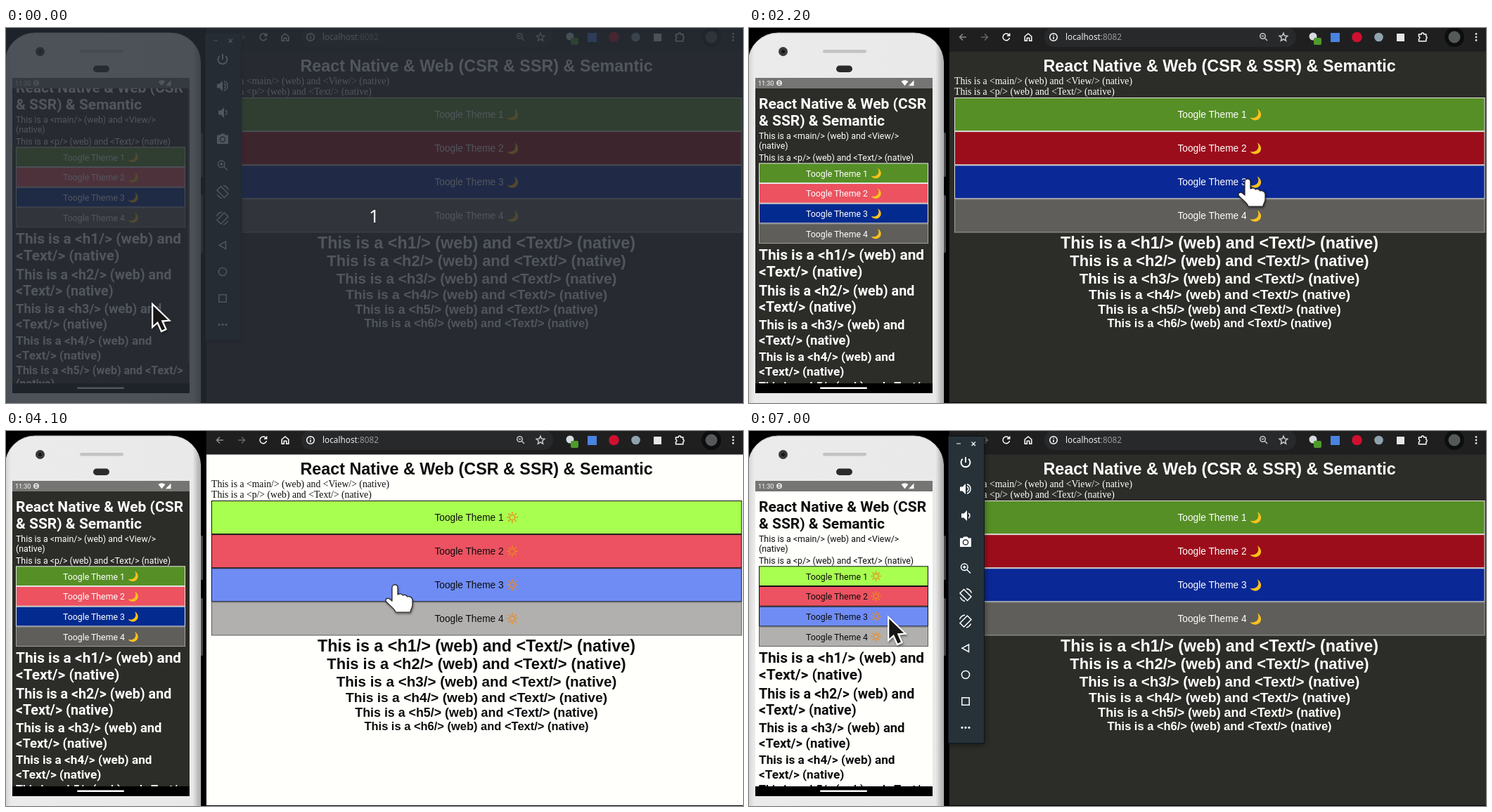
Animation of 1048x534 px, one loop 8 s. Source, as an HTML page:

```html
<!DOCTYPE html>
<html lang="en">
<head>
<meta charset="utf-8">
<title>Theme toggle demo</title>
<style>
html, body { margin: 0; width: 100%; height: 100%; overflow: hidden; background: #000; }
svg { display: block; width: 1048px; height: 534px; }
.dark { --bg: #2c2c28; --fg: #fff; --line: #e4e4e0; --line4: #a3a29e;
  --b1: #568f26; --b2: #9c0d1b; --b3: #0a2896; --b4: #5f5e5a; }
.light { --bg: #fffffc; --fg: #0c0c0c; --line: #111; --line4: #5c5c5a;
  --b1: #a8ff50; --b2: #ec5261; --b3: #6f8cf5; --b4: #b1b0ae; }
#phone.dark { --b2: #ec5260; --b3: #032a8f; }
.bg { fill: var(--bg); }
.page text { fill: var(--fg); }
.dark .sun, .light .moon { display: none; }
.roboto { font-family: Roboto, sans-serif; }
.sans { font-family: "Liberation Sans", Arial, sans-serif; }
.serif { font-family: "Liberation Serif", "Times New Roman", serif; }
.ui { font-family: "Noto Sans", "Open Sans", sans-serif; }
.icon { fill: none; stroke: #fff; stroke-width: 1.5; }
.solid { fill: #fff; stroke: none; }
</style>
</head>
<body>
<svg viewBox="0 0 1048 534">
  <defs>
    <clipPath id="screen"><rect x="9" y="86" width="252" height="420"/></clipPath>
    <linearGradient id="shell">
      <stop offset="0" stop-color="#d2d2d2"/><stop offset=".03" stop-color="#ebebeb"/>
      <stop offset=".96" stop-color="#e9e9e9"/><stop offset="1" stop-color="#a9a9a9"/>
    </linearGradient>
    <filter id="shadow" x="-50%" y="-50%" width="200%" height="200%">
      <feDropShadow dx="1" dy="2" stdDeviation="1.5" flood-opacity=".45"/>
    </filter>
    <filter id="glow" x="-40%" y="-10%" width="180%" height="120%">
      <feDropShadow dx="0" dy="2" stdDeviation="4" flood-opacity=".5"/>
    </filter>
    <path id="moon" fill="#fcc21b" d="M10.5.5C17 4 17.5 12 11.5 15C7.5 17 3 15.5.8 12.3C5 13.5 9 12.5 11 9.5C12.8 6.8 12.5 3.3 10.5.5Z"/>
    <g id="sun" fill="none" stroke="#ee8a1c" stroke-width="1.4">
      <circle cx="8" cy="8" r="3.6"/>
      <path d="M8 .3V3M8 13V15.7M.3 8H3M13 8H15.7M2.6 2.6L4.4 4.4M11.6 11.6L13.4 13.4M2.6 13.4L4.4 11.6M11.6 4.4L13.4 2.6"/>
    </g>
  </defs>

  <rect width="1048" height="534"/>

  <!-- handset -->
  <g fill="#4a4a4a">
    <rect x="275" y="149" width="5" height="63" rx="1.5"/>
    <rect x="275" y="238" width="5" height="82" rx="1.5"/>
  </g>
  <rect x="-1" y="7" width="277.5" height="600" rx="42" fill="url(#shell)" stroke="#c4c4c4"/>
  <circle cx="48.5" cy="33.5" r="6.5" fill="#3a3a3c"/>
  <circle cx="48.5" cy="33.5" r="2.6" fill="#15171c"/>
  <rect x="105" y="31" width="62" height="4.5" rx="2.2" fill="#c3c3c3"/>
  <rect x="124" y="53.5" width="23" height="9.5" rx="4.7" fill="#2b2b2d"/>
  <g id="phone" class="page dark">
    <rect class="bg" x="9" y="86" width="252" height="420"/>
    <g clip-path="url(#screen)">
      <g id="content" class="roboto"></g>
      <rect id="bar" x="258.5" y="86" width="2.2" height="391" fill="#777" opacity=".6"/>
    </g>
  </g>
  <rect x="9" y="71" width="252" height="15" fill="#757573"/>
  <text class="roboto" x="13" y="81.5" font-size="9" fill="#fff">11:30</text>
  <circle cx="43" cy="78.3" r="3.2" fill="none" stroke="#fff" stroke-width="1.3"/>
  <path d="M40 78.3H46" stroke="#fff" stroke-width="1.3"/>
  <path d="M216.5 76Q221.5 72.6 226.5 76L221.5 82.3ZM227 82.3H234.5V74.5Z" fill="#fff"/>
  <rect x="9" y="506" width="252" height="14"/>
  <rect x="101" y="511.5" width="67" height="2.6" rx="1.3" fill="#fff"/>

  <!-- browser -->
  <rect x="285" width="763" height="34" fill="#1f1f20"/>
  <rect x="420" y="-1" width="358" height="28" rx="14" fill="#28292a"/>
  <g class="icon" stroke-width="1.4">
    <path stroke="#8b8b8b" d="M309 13H299.5M304 8.5L299.5 13L304 17.5"/>
    <path stroke="#666" d="M330 13H339.5M335 8.5L339.5 13L335 17.5"/>
    <path d="M369.7 10A4.8 4.8 0 1 0 370.5 14M370.7 7.5V11H367"/>
    <path d="M392.2 12L397 8L401.8 12V18.3H398.7V14.3H395.3V18.3H392.2Z"/>
    <circle cx="433" cy="13" r="5.3"/><path d="M433 12.3V16M433 9.7V11"/>
    <g stroke="#c5c5c5"><circle cx="730.5" cy="11.5" r="3.8"/><path d="M733.3 14.3L737 18M728.7 11.5H732.3"/>
    <path d="M760 7.2L761.7 11L765.8 11.4L762.7 14.1L763.6 18.2L760 16L756.4 18.2L757.3 14.1L754.2 11.4L758.3 11Z"/></g>
    <path d="M952.5 9H956A1.9 1.9 0 0 1 959.8 9H962.8V12A1.9 1.9 0 0 1 962.8 15.6V18.7H952.5V15.6A1.9 1.9 0 0 0 952.5 12Z"/>
  </g>
  <text class="ui" x="450" y="17" font-size="11.8" fill="#eee">localhost<tspan fill="#9a9a9a">:8082</tspan></text>
  <circle cx="802" cy="12" r="5.5" fill="#d5dbe0"/>
  <rect x="803" y="14" width="11" height="10" rx="2" fill="#4f9a2c"/>
  <rect x="827" y="7" width="13" height="13" fill="#4a83e0"/>
  <circle cx="864.5" cy="13" r="7.3" fill="#d0102f"/>
  <circle cx="895.5" cy="13" r="6.3" fill="#8fa3ad"/>
  <rect x="921" y="8" width="11" height="11" fill="#e6e6e6"/>
  <circle cx="1003" cy="13" r="14" fill="#0d0e0e"/>
  <circle cx="1003" cy="13" r="8.5" fill="#55595a"/>
  <g fill="#ddd"><circle cx="1034" cy="8.5" r="1.4"/><circle cx="1034" cy="13" r="1.4"/><circle cx="1034" cy="17.5" r="1.4"/></g>
  <g id="web" class="page dark">
    <rect class="bg" x="285" y="33.5" width="763" height="499.5"/>
  </g>

  <!-- emulator controls -->
  <g id="tools">
    <rect x="283.5" y="7.5" width="51" height="437" fill="#263238" stroke="#11181b" filter="url(#glow)"/>
    <g class="icon">
      <path stroke-width="1.1" d="M295 18H301M316.5 15.5L322 21M322 15.5L316.5 21"/>
      <path stroke-width="2" d="M308 37V45M303.8 39.8A6.5 6.5 0 1 0 312.2 39.8"/>
      <path class="solid" d="M300 79.5H303.5L308 75V90L303.5 85.5H300ZM302 117.5H305.5L310 113V128L305.5 123.5H302Z"/>
      <path d="M310 79A4 4 0 0 1 310 86M310 75.8A7 7 0 0 1 310 89.2M312 117A4 4 0 0 1 312 124"/>
      <path class="solid" d="M300 152.5H304L305.5 150.5H310.5L312 152.5H316V165H300Z"/>
      <circle cx="308" cy="158.5" r="3.6" fill="#fff" stroke="#263238"/>
      <circle cx="306.3" cy="193.8" r="4.8"/><path d="M309.8 197.5L315 202.5M304 193.8H308.6M306.3 191.5V196.1"/>
      <g id="turn"><path d="M305.5 225.5L316 236L310.5 241.5L300 231ZM300.5 237A10 10 0 0 0 307 242.5M309 224.5A10 10 0 0 1 316.5 230.5"/></g>
      <use href="#turn" transform="translate(616 37.5) scale(-1 1)"/>
      <path d="M312.5 304V314.5L303 309.2Z"/>
      <circle cx="308" cy="347" r="5.6"/>
      <rect x="302.8" y="379.8" width="10.4" height="10.4"/>
      <path stroke-width="3.2" stroke-linecap="round" d="M303 422.3h.01M308 422.3h.01M313 422.3h.01"/>
    </g>
  </g>

  <g id="veil">
    <rect width="1048" height="534" fill="#262b34" opacity=".8"/>
    <text class="ui" x="523.5" y="277" font-size="26" fill="#fff" text-anchor="middle">1</text>
  </g>

  <g id="pointer" filter="url(#shadow)">
    <path id="arrow" fill="#151515" stroke="#fff" stroke-width="2.2" d="M1.2 3V36L8.5 29.5L14 42L20.5 39L15.3 27.3L25.5 26.5Z"/>
    <path id="hand" fill="#fff" stroke="#222" stroke-width="1.2" stroke-linejoin="round" d="M-4 5C-4-.5 4-.5 4 5V15C7 13 10 14 11 16C14 14.5 17 16 17.5 18C21 17 25 19 25 23V30C25 34 22 36 22 40H1C0 35-7 31-12.5 25C-14.5 21-10 18.500-7 21.500L-4 24Z"/>
  </g>
</svg>
<script>
const NS = 'http://www.w3.org/2000/svg';
const $ = id => document.getElementById(id);

function add(parent, tag, attrs, text) {
  const el = document.createElementNS(NS, tag);
  for (const key in attrs) el.setAttribute(key, attrs[key]);
  if (text) el.textContent = text;
  parent.appendChild(el);
  return el;
}

const write = (parent, x, y, size, text, more) =>
  add(parent, 'text', { x, y, 'font-size': size, ...more }, text);

function buttons(parent, box, label) {
  for (let i = 0; i < 4; i++) {
    const y = box.y + i * box.h;
    add(parent, 'rect', {
      x: box.x + .5, y: y + .5, width: box.w - 1, height: box.h - 1,
      style: `fill:var(--b${i + 1});stroke:var(--line${i === 3 ? '4' : ''})`
    });
    const mid = y + box.h / 2;
    write(parent, label.x, mid + label.dy, label.size, `Toogle Theme ${i + 1}`, { class: label.font });
    for (const name of ['moon', 'sun'])
      add(parent, 'use', {
        href: '#' + name, class: name,
        transform: `translate(${label.icon} ${mid - label.s * 8}) scale(${label.s})`
      });
  }
}

const bold = { 'font-weight': 700 };

function buildPhone() {
  const g = $('content');
  write(g, 14, 114.5, 21, 'React Native & Web (CSR', bold);
  write(g, 14, 139, 21, '& SSR) & Semantic', bold);
  write(g, 14, 158, 12.34, 'This is a <main/> (web) and <View/>');
  write(g, 14, 172.3, 12.34, '(native)');
  write(g, 14, 188.7, 12.34, 'This is a <p/> (web) and <Text/> (native)');
  buttons(g, { x: 14, y: 192.3, w: 241, h: 28.7 },
    { x: 81, dy: 4.9, size: 12.3, icon: 173, s: .94, font: 'roboto' });
  [[329.7, 24.6], [380.7, 23.6], [429, 22], [473.8, 21]].forEach(([y, gap], i) => {
    const size = 20.9 - i * 1.23;
    write(g, 14, y, size, `This is a <h${i + 1}/> (web) and`, bold);
    write(g, 14, y + gap, size, '<Text/> (native)', bold);
  });
  write(g, 14, 516.3, 16, 'This is a <h5/> (web) and <Text/>', bold);
  write(g, 14, 535, 16, '(native)', bold);
}

function buildWeb() {
  const g = $('web'), zoom = .6863;
  const title = { ...bold, class: 'sans', 'text-anchor': 'middle' };
  write(g, 669, 62, 34 * zoom, 'React Native & Web (CSR & SSR) & Semantic', title);
  write(g, 292, 80, 20 * zoom, 'This is a <main/> (web) and <View/> (native)', { class: 'serif' });
  write(g, 292, 95.2, 20 * zoom, 'This is a <p/> (web) and <Text/> (native)', { class: 'serif' });
  buttons(g, { x: 292, y: 99, w: 754.5, h: 48.1 },
    { x: 609.5, dy: 5, size: 20 * zoom, icon: 711.5, s: 1.06, font: 'sans' });
  [313.5, 339.3, 363.5, 386.3, 407.3, 426.3].forEach((y, i) =>
    write(g, 669, y, (34 - 2 * i) * zoom, `This is a <h${i + 1}/> (web) and <Text/> (native)`, title));
}

// Pointer moves: first and last tick (100 ms each), then where it ends.
const moves = [
  [1, 2, 208, 430], [4, 6, 211, 488], [8, 15, 613, 287], [16, 16, 629, 283], [17, 21, 709, 214],
  [31, 31, 706, 222], [32, 32, 695, 233], [33, 33, 680, 225], [34, 34, 668, 214],
  [37, 37, 620, 230], [38, 38, 570, 227], [40, 40, 563, 222], [41, 41, 553, 218],
  [49, 51, 320, 243], [54, 54, 240, 243], [55, 55, 192, 255], [57, 58, 199, 266],
  [69, 69, 221, 268], [70, 70, 197, 262]
];
const smooth = k => k * k * (3 - 2 * k);

function pointerAt(tick) {
  let x = 207, y = 390;
  for (const [from, to, endX, endY] of moves) {
    if (tick < from) break;
    const k = smooth(Math.min(1, (tick - from + 1) / (to - from + 1)));
    x += (endX - x) * k;
    y += (endY - y) * k;
  }
  return [x, y];
}

function pullAt(tick) {
  if (tick < 4 || tick > 12) return 0;
  return tick < 8 ? Math.min(1, (tick - 3) / 3) : Math.pow(.55, tick - 7) * (12 - tick) / 4;
}

const show = (id, on) => $(id).setAttribute('display', on ? 'inline' : 'none');
const theme = (id, light) => $(id).setAttribute('class', 'page ' + (light ? 'light' : 'dark'));

function draw(ms) {
  const tick = Math.floor(ms / 100);
  const pull = pullAt(tick);
  const scroll = -23 * Math.max(0, 1 - tick / 2);
  $('content').setAttribute('transform',
    `translate(0 ${86 + scroll + .5 * pull}) scale(1 ${1 + .019 * pull}) translate(0 -86)`);
  $('bar').setAttribute('opacity', .6 * Math.max(0, Math.min(1, (13 - tick) / 4)));

  theme('web', tick >= 23 && tick < 45);
  theme('phone', tick >= 62);
  show('tools', tick < 22 || tick >= 60);
  $('veil').setAttribute('opacity', Math.max(0, 1 - tick / 2));

  const hand = tick >= 16 && tick <= 50;
  show('hand', hand);
  show('arrow', !hand);
  $('pointer').setAttribute('transform', `translate(${pointerAt(tick)})`);
}

buildPhone();
buildWeb();
draw(0);
const start = performance.now();
(function loop() {
  draw((performance.now() - start) % 8000);
  requestAnimationFrame(loop);
})();
</script>
</body>
</html>
```
